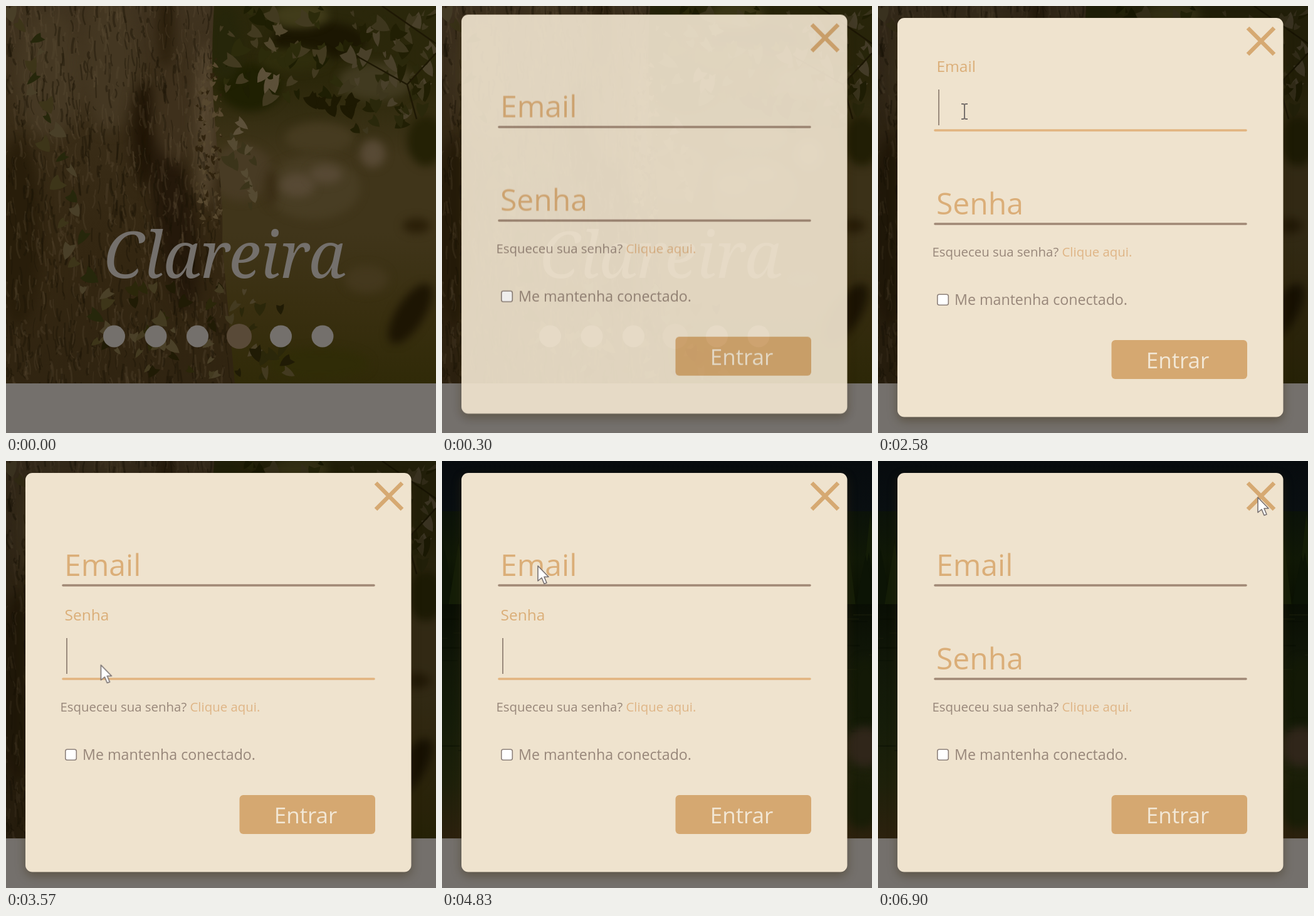
An HTML page with a canvas that plays this animation: 686 by 680 pixels, repeating every 7.36 s.

```html
<!DOCTYPE html>
<html lang="pt">
<head>
<meta charset="utf-8">
<title>Login</title>
<style>
html, body { margin: 0; width: 100%; height: 100%; overflow: hidden; background: #74706c; }
canvas, svg { position: absolute; left: 0; top: 0; }
svg { font-family: "Open Sans", "Noto Sans", sans-serif; }

.loop { animation: 7.36s linear infinite; }
#forest { animation-name: dim; }
#lake { animation-name: next-slide; }
.slide { animation-name: leave; }
.card { animation-name: drop; }
.email .label { animation-name: email-label; }
.email .line { animation-name: email-line; }
.email .caret { animation-name: email-caret; }
.senha .label { animation-name: senha-label; }
.senha .line { animation-name: senha-line; }
.senha .caret { animation-name: senha-caret; }
.pointer { animation-name: move; }
.arrow { animation-name: arrow; }
.beam { animation-name: beam; }
.email .caret, .senha .caret, .arrow, .beam { animation-timing-function: step-end; }

.title { font: italic 300 102px "Noto Serif", serif; fill: #74706c; }
.panel { fill: #efe3ce; filter: drop-shadow(0 6px 8px rgba(55, 40, 10, .4)); }
.label { font-size: 48px; fill: #dbae78; }
.line { stroke: #a08875; stroke-width: 3.6; stroke-linecap: round; }
.caret { stroke: #8f8073; stroke-width: 1.8; }
.note { fill: #98877a; }
.link { fill: #dfb586; }

@keyframes drop {
  0% { opacity: 0; transform: translateY(-72px); animation-timing-function: ease; }
  6.11%, 100% { opacity: 1; transform: none; }
}
@keyframes dim {
  0%, 2% { filter: brightness(1); }
  8%, 50% { filter: brightness(.78); }
  56%, 100% { filter: brightness(1); }
}
@keyframes next-slide {
  0%, 59.5% { opacity: 0; }
  64.4%, 100% { opacity: 1; }
}
@keyframes leave {
  0%, 59.5% { opacity: 1; }
  64.4%, 100% { opacity: 0; }
}
@keyframes email-label {
  0%, 28.53%, 44.16%, 69.29%, 84.92%, 100% { transform: translate(93px, 182.5px); animation-timing-function: ease; }
  31.25%, 41.44%, 72.01%, 82.2% { transform: translate(93.5px, 105px) scale(.51); animation-timing-function: ease; }
}
@keyframes senha-label {
  0%, 41.44%, 72.01%, 100% { transform: translate(93px, 182.5px); animation-timing-function: ease; }
  44.16%, 69.29% { transform: translate(93.5px, 105px) scale(.51); animation-timing-function: ease; }
}
@keyframes email-line {
  0%, 28.53%, 44.16%, 69.29%, 84.92%, 100% { stroke: #a08875; }
  31.25%, 41.44%, 72.01%, 82.2% { stroke: #e2b47f; }
}
@keyframes senha-line {
  0%, 41.44%, 72.01%, 100% { stroke: #a08875; }
  44.16%, 69.29% { stroke: #e2b47f; }
}
@keyframes email-caret {
  0%, 36.68%, 77.45%, 100% { opacity: 0; }
  28.53%, 69.29% { opacity: 1; }
}
@keyframes senha-caret {
  0%, 49.59%, 65.9%, 100% { opacity: 0; }
  41.44%, 57.74% { opacity: 1; }
}
@keyframes move {
  0%, 12.77% { transform: translate(720px, 330px); }
  13.45% { transform: translate(614px, 287px); }
  13.86% { transform: translate(512px, 252px); }
  14.27% { transform: translate(410px, 240px); }
  14.67% { transform: translate(312px, 222px); }
  15.08%, 20.38% { transform: translate(285px, 208px); }
  21.2% { transform: translate(228px, 172px); }
  22.01%, 37.36% { transform: translate(138px, 168px); }
  39.4%, 47.55% { transform: translate(150px, 312px); }
  50.27%, 54.35% { transform: translate(154px, 348px); }
  58.1%, 62.5% { transform: translate(174px, 228px); }
  65.4%, 74.73% { transform: translate(153px, 167px); }
  77.45%, 84.24% { transform: translate(315px, 156px); }
  85.6% { transform: translate(420px, 130px); }
  86.96% { transform: translate(550px, 115px); }
  88.3%, 91.71% { transform: translate(600px, 71px); }
  93.7%, 100% { transform: translate(606px, 58px); }
}
@keyframes beam {
  0%, 38.2%, 48.4%, 85.2%, 100% { opacity: 0; }
  28.53%, 41.44%, 69.29% { opacity: 1; }
}
@keyframes arrow {
  0%, 38.2%, 48.4%, 85.2%, 100% { opacity: 1; }
  28.53%, 41.44%, 69.29% { opacity: 0; }
}
</style>
</head>
<body>
<canvas id="forest" class="loop" width="686" height="601"></canvas>
<canvas id="lake" class="loop" width="686" height="601"></canvas>
<svg width="686" height="680" viewBox="0 0 686 680">
  <g class="slide loop">
    <text class="title" x="349" y="433" text-anchor="middle">Clareira</text>
    <g fill="#74706c">
      <circle cx="172.5" cy="526" r="17.5"/>
      <circle cx="239" cy="526" r="17.5"/>
      <circle cx="305.5" cy="526" r="17.5"/>
      <circle cx="372" cy="526" r="20" fill="#594a38"/>
      <circle cx="438.5" cy="526" r="17.5"/>
      <circle cx="505" cy="526" r="17.5"/>
    </g>
  </g>

  <g class="card loop">
    <rect class="panel" x="31" y="19" width="615.5" height="635.5" rx="11"/>
    <path d="M590 35L632 77M632 35L590 77" stroke="#d6a972" stroke-width="6.5"/>
    <g class="email">
      <text class="label loop">Email</text>
      <path class="line loop" d="M91 198H587"/>
      <path class="caret loop" d="M97 133V190"/>
    </g>
    <g class="senha" transform="translate(0 149)">
      <text class="label loop">Senha</text>
      <path class="line loop" d="M91 198H587"/>
      <path class="caret loop" d="M97 133V190"/>
    </g>
    <text class="note" x="86.5" y="399" font-size="20.4">Esqueceu sua senha? <tspan class="link">Clique aqui.</tspan></text>
    <rect x="94.8" y="459.3" width="17.5" height="17" rx="3" fill="#fff" stroke="#8d817a" stroke-width="1.6"/>
    <text class="note" x="122" y="476" font-size="23.2">Me mantenha conectado.</text>
    <rect x="372.5" y="532" width="216.5" height="62" rx="6" fill="#d5a871"/>
    <text x="427.7" y="577" font-size="35" fill="#f2e7d5">Entrar</text>
  </g>

  <g class="pointer loop">
    <path class="arrow loop" d="M0 0V24L6 19L10 28.500L14 27L10 17.500H17Z" fill="#fff" stroke="#777070" stroke-width="1.6" stroke-linejoin="round"/>
    <path class="beam loop" d="M-5 -12H-2L0 -11L2 -12H5M0 -11V11M-5 12H-2L0 11L2 12H5" fill="none" stroke="#77706c" stroke-width="2"/>
  </g>
</svg>
<script>
const W = 686, H = 601;

function scene(id, paint) {
  let seed = 7;
  const rnd = (a, b) => {
    seed = (seed * 16807) % 2147483647;
    return a + (b - a) * seed / 2147483647;
  };
  paint(document.getElementById(id).getContext('2d'), rnd);
}

function fade(c, x, w, y, h, ...stops) {
  const g = c.createLinearGradient(0, y, 0, y + h);
  stops.forEach((s, i) => g.addColorStop(i / (stops.length - 1), s));
  c.fillStyle = g;
  c.fillRect(x, y, w, h);
}

function blob(c, x, y, rx, ry, color, turn = 0) {
  c.fillStyle = color;
  c.beginPath();
  c.ellipse(x, y, rx, ry, turn, 0, 7);
  c.fill();
}

function soft(c, blur, draw) {
  c.filter = `blur(${blur}px)`;
  draw();
  c.filter = 'none';
}

scene('forest', (c, rnd) => {
  fade(c, 0, W, 0, H, '#2a270b', '#2b270a', '#40351a', '#40351a', '#392f10', '#302a08');

  // Out-of-focus glade
  soft(c, 7, () => {
    blob(c, 500, 55, 75, 30, '#1b1602');
    blob(c, 390, 130, 50, 38, '#1f2002');
    blob(c, 350, 60, 25, 60, '#26260a');
    blob(c, 470, 15, 45, 20, '#413c1a');
    blob(c, 460, 85, 55, 18, '#2f2d0c');
    blob(c, 590, 120, 60, 30, '#413a20');
    blob(c, 500, 210, 55, 25, '#463b20');
    blob(c, 375, 265, 50, 45, '#483b24');
    blob(c, 490, 290, 75, 50, '#483d23');
    blob(c, 423, 290, 10, 30, '#3a2d15');
    blob(c, 465, 285, 28, 19, '#574934');
    blob(c, 510, 268, 26, 15, '#574934');
    blob(c, 585, 235, 20, 22, '#584a35');
    blob(c, 670, 215, 30, 40, '#242105');
    blob(c, 655, 350, 22, 12, '#2a1f08');
    blob(c, 575, 435, 35, 22, '#44381d');
    blob(c, 645, 490, 55, 22, '#1d1503', -1);
    blob(c, 500, 570, 80, 25, '#302c07');
  });

  // Trunk
  c.save();
  c.beginPath();
  c.moveTo(0, 0);
  c.lineTo(332, 0);
  c.bezierCurveTo(320, 180, 350, 260, 345, 380);
  c.lineTo(365, H);
  c.lineTo(0, H);
  c.clip();
  fade(c, 0, W, 0, H, '#403320', '#392c17', '#332611', '#302411');
  soft(c, 10, () => {
    blob(c, 70, 110, 55, 100, '#453823');
    blob(c, 165, 90, 45, 110, '#443722');
    blob(c, 20, 360, 35, 150, '#281d0a');
    blob(c, 222, 205, 22, 85, '#201506');
    blob(c, 255, 30, 12, 70, '#291d0a');
    blob(c, 270, 345, 32, 140, '#24180a', -.15);
    blob(c, 270, 175, 34, 75, '#3e301c');
    blob(c, 318, 190, 16, 130, '#54452f');
  });
  for (let i = 0; i < 1500; i++) {
    const x = rnd(0, 370), y = rnd(-20, H), len = rnd(6, 34);
    c.strokeStyle = i % 2 ? 'rgba(28,19,5,.42)' : 'rgba(92,78,55,.26)';
    c.lineWidth = rnd(1, 4);
    c.beginPath();
    c.moveTo(x, y);
    c.quadraticCurveTo(x + rnd(-6, 6), y + len / 2, x + rnd(-3, 5), y + len);
    c.stroke();
  }
  c.restore();

  // Ivy and branches
  const leaf = (x, y, size, color) => {
    const w = size * rnd(.35, .75);
    c.save();
    c.translate(x, y);
    c.rotate(rnd(-1.1, 1.1));
    c.fillStyle = color;
    c.beginPath();
    c.moveTo(0, size);
    c.quadraticCurveTo(-w * 1.3, size * .2, -w, -size * .6);
    c.lineTo(0, -size * .4);
    c.lineTo(w, -size * .7);
    c.quadraticCurveTo(w, size * .3, 0, size);
    c.fill();
    c.restore();
  };
  const ivy = (n, x, y, w, h, min, max, ...colors) => {
    for (let i = 0; i < n; i++) leaf(rnd(x, x + w), rnd(y, y + h), rnd(min, max), colors[i % colors.length]);
  };
  for (let i = 0; i < 26; i++) {
    leaf(20 + i * 5.5 + rnd(-22, 22), 10 + i * 21, rnd(8, 18), ['#493f28', '#3d3519', '#26270b'][i % 3]);
  }
  ivy(110, 305, 80, 38, 270, 2, 7, '#57482f', '#4a3c24', '#30230e');
  ivy(14, 355, 170, 45, 160, 7, 15, '#554a32', '#3b341a');
  ivy(55, 150, 445, 310, 150, 6, 16, '#433a20', '#2b270a', '#201b05', '#4a4028');
  ivy(45, 340, 0, 200, 150, 6, 20, '#1e1e03', '#2c2b0b', '#423a20');
  ivy(70, 540, 0, 146, 200, 6, 20, '#211f04', '#49402a', '#2a280b', '#3d361d');
  ivy(10, 485, 145, 70, 20, 10, 18, '#1d1902');
  ivy(4, 405, 105, 35, 25, 11, 17, '#5c5039');
  ivy(3, 420, 25, 20, 40, 10, 16, '#51472e');
  ivy(2, 365, 180, 15, 20, 10, 15, '#5c5039');
  c.strokeStyle = '#1e1804';
  c.lineWidth = 2.5;
  c.stroke(new Path2D('M686 75L640 125L560 80M640 125L655 180M600 0L686 60'));
});

scene('lake', (c, rnd) => {
  fade(c, 0, W, 0, 110, '#070b0e', '#0a1012');
  fade(c, 0, W, 80, 150, '#0b1209', '#101806', '#0a1003');
  for (let i = 0; i < 90; i++) {
    const x = rnd(-10, W), top = rnd(65, 150);
    c.fillStyle = i % 2 ? '#0c1405' : '#141d07';
    c.beginPath();
    c.moveTo(x, top);
    c.lineTo(x + 16, 230);
    c.lineTo(x - 16, 230);
    c.fill();
  }
  fade(c, 0, W, 228, H - 228, '#090e04', '#111708', '#151c09', '#1d200a', '#2c210e');
  for (let i = 0; i < 100; i++) {
    c.fillStyle = i % 2 ? 'rgba(6,10,2,.4)' : 'rgba(40,43,18,.3)';
    c.fillRect(rnd(-40, W), rnd(235, 590), rnd(20, 90), rnd(1, 3));
  }
  soft(c, 7, () => {
    blob(c, 675, 370, 24, 55, '#131906');
    blob(c, 675, 455, 32, 32, '#30261a');
    blob(c, 670, 545, 30, 40, '#191d07');
  });
});
</script>
</body>
</html>
```
